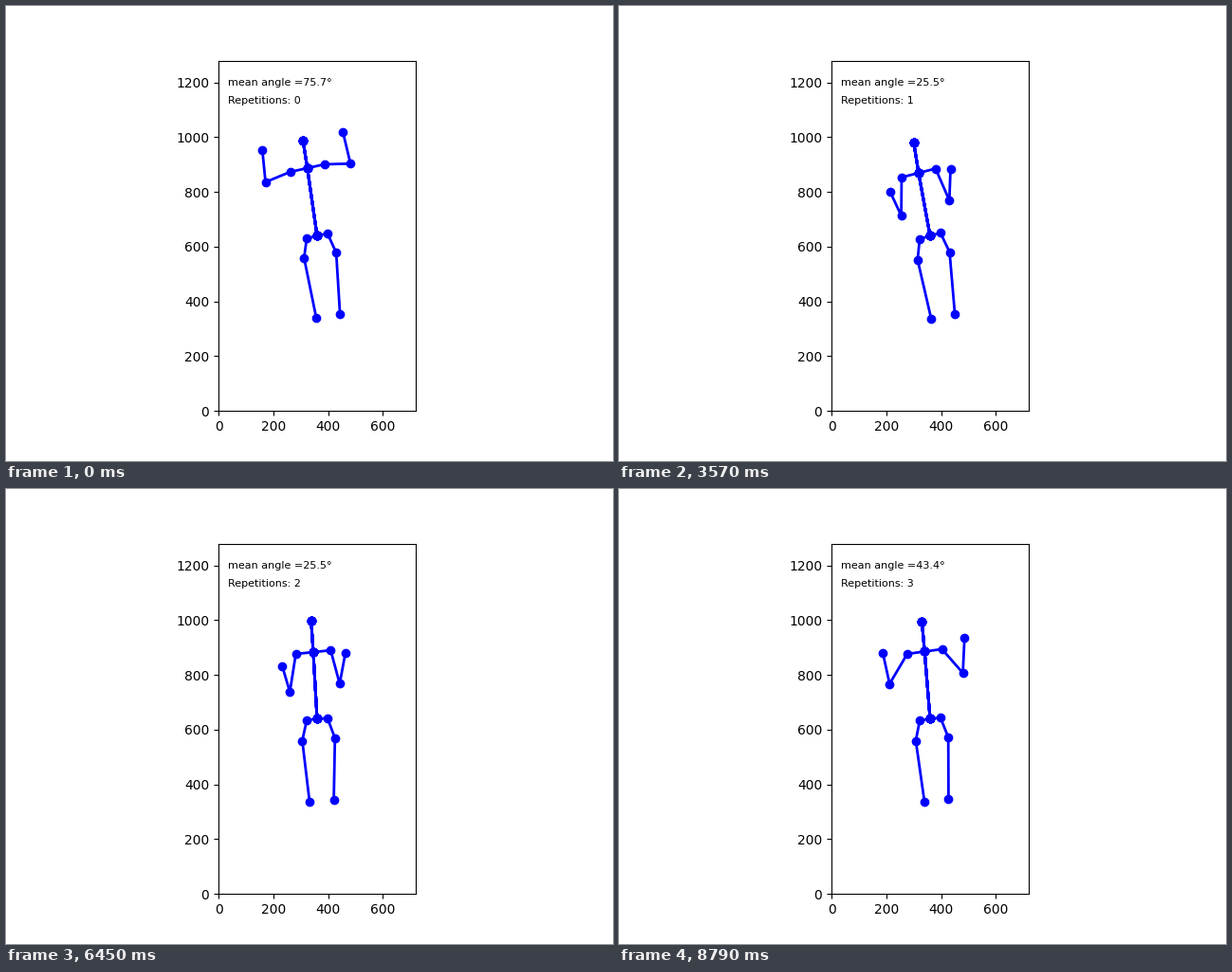
Animation of 640 by 480 pixels, one loop 8.82 s. Source, as a matplotlib script:

```python
import numpy as np
import matplotlib.pyplot as plt
from matplotlib.animation import FuncAnimation

STEP = 30
FRAMES = 294
HIP = 360 + 640j

# Each press in seconds: rise starts, top reached, top left, bottom reached
PRESSES = [(-1, -0.5, -0.45, 0.474), (1.42, 1.9, 2.7, 3.55),
           (4.1, 4.95, 5.2, 6.3), (6.85, 7.6, 8.1, 9.05)]

# Sideways tilt of the shoulders in degrees
TILT_T = [0, 1.41, 2.7, 3.57, 5.1, 6.45, 8.1, 9]
TILT = [12.5, 12, 12.5, 14.4, 4.8, 6, 7.8, 7.8]

# Upper arm angle, with the forearm's angle and length that go with it
SWING = [12, 36, 80, 142]
FOREARM = [13.5, 7.5, -4, 31.5]
FORE_LEN = [106, 122, 119, 128]

# Hip, knee, ankle of each leg: upright place, and shift per degree of tilt
RIGHT_LEG = np.array([322 + 639j, 300 + 565j, 310 + 337j])
RIGHT_SHIFT = np.array([-0.75j, 1 - 0.9j, 3.75])
RIGHT_LIFT = np.array([0, 10j, 7j])
LEFT_LEG = np.array([398 + 636j, 421 + 562j, 400 + 336j])
LEFT_SHIFT = np.array([1j, 0.7 + 1.3j, 3.5 + 1.3j])


def ease(t, start, end):
    s = np.clip((t - start) / (end - start), 0, 1)
    return s * s * (3 - 2 * s)


def lift_at(t):
    return sum(ease(t, a, b) - ease(t, c, d) for a, b, c, d in PRESSES)


def tilt_at(t):
    steps = zip(TILT_T, TILT_T[1:], np.diff(TILT))
    return TILT[0] + sum(d * ease(t, a, b) for a, b, d in steps)


def arm(side, lift):
    """Shoulder, elbow, wrist relative to the neck, before tilting."""
    swing = 12 + 130 * lift
    c = np.cos(np.radians(swing))
    upper = np.radians(swing - side * 3 * c)
    fore = np.radians(np.interp(swing, SWING, FOREARM) + side * 3)
    upper_len = 95 + 40 * c**2 - side * 7 * c
    fore_len = np.interp(swing, SWING, FORE_LEN) + side * 9 * c**2
    shoulder = side * 64
    elbow = shoulder + upper_len * (side * np.sin(upper) - 1j * np.cos(upper))
    wrist = elbow + fore_len * (side * np.sin(fore) + 1j * np.cos(fore))
    return np.array([shoulder, elbow, wrist])


def elbow_angle(points):
    shoulder, elbow, wrist = points
    return abs(np.angle((shoulder - elbow) / (wrist - elbow), deg=True))


def body(t):
    """Polylines of the figure as complex points, and the mean elbow angle."""
    lift, tilt = lift_at(t), tilt_at(t)
    x = 366 - tilt / 0.3
    neck = x + 1j * (873.5 + 0.5 * (x - 326) + 28 * lift)
    head = neck - 1.25 * tilt + 1j * (113 - 26 * lift)
    turn = np.exp(1j * np.radians(tilt))
    right, left = (neck + turn * arm(side, lift) for side in (-1, 1))
    parts = [
        [neck, *right],
        [neck, *left],
        [HIP, *(RIGHT_LEG + RIGHT_SHIFT * tilt + RIGHT_LIFT * lift)],
        [HIP, *(LEFT_LEG + LEFT_SHIFT * tilt)],
        [head, neck, HIP],
    ]
    return parts, (elbow_angle(right) + elbow_angle(left)) / 2


def count_reps(angles):
    reps, ready, out = 0, False, []
    for angle in angles:
        if angle < 60:
            ready = True
        elif ready and angle > 160:
            reps, ready = reps + 1, False
        out.append(reps)
    return out


frames = [body(n * STEP / 1000) for n in range(FRAMES)]
reps = count_reps(angle for _, angle in frames)

fig, ax = plt.subplots(figsize=(6.4, 4.8), dpi=100)
ax.set_xlim(0, 720)
ax.set_ylim(0, 1280)
ax.set_aspect("equal")
angle_text = ax.text(35, 1188, "", fontsize=8)
reps_text = ax.text(35, 1122, "", fontsize=8)
# Four limbs, then the spine drawn over itself for its hard edge.
lines = [ax.plot([], [], "bo-", lw=2)[0] for _ in range(14)]


def draw(n):
    parts, angle = frames[n]
    for i, line in enumerate(lines):
        points = np.array(parts[min(i, 4)])
        line.set_data(points.real, points.imag)
    angle_text.set_text(f"mean angle ={angle:.1f}°")
    reps_text.set_text(f"Repetitions: {reps[n]}")
    return [*lines, angle_text, reps_text]


anim = FuncAnimation(fig, draw, frames=FRAMES, interval=STEP, repeat=True, repeat_delay=0)
plt.show()
```
